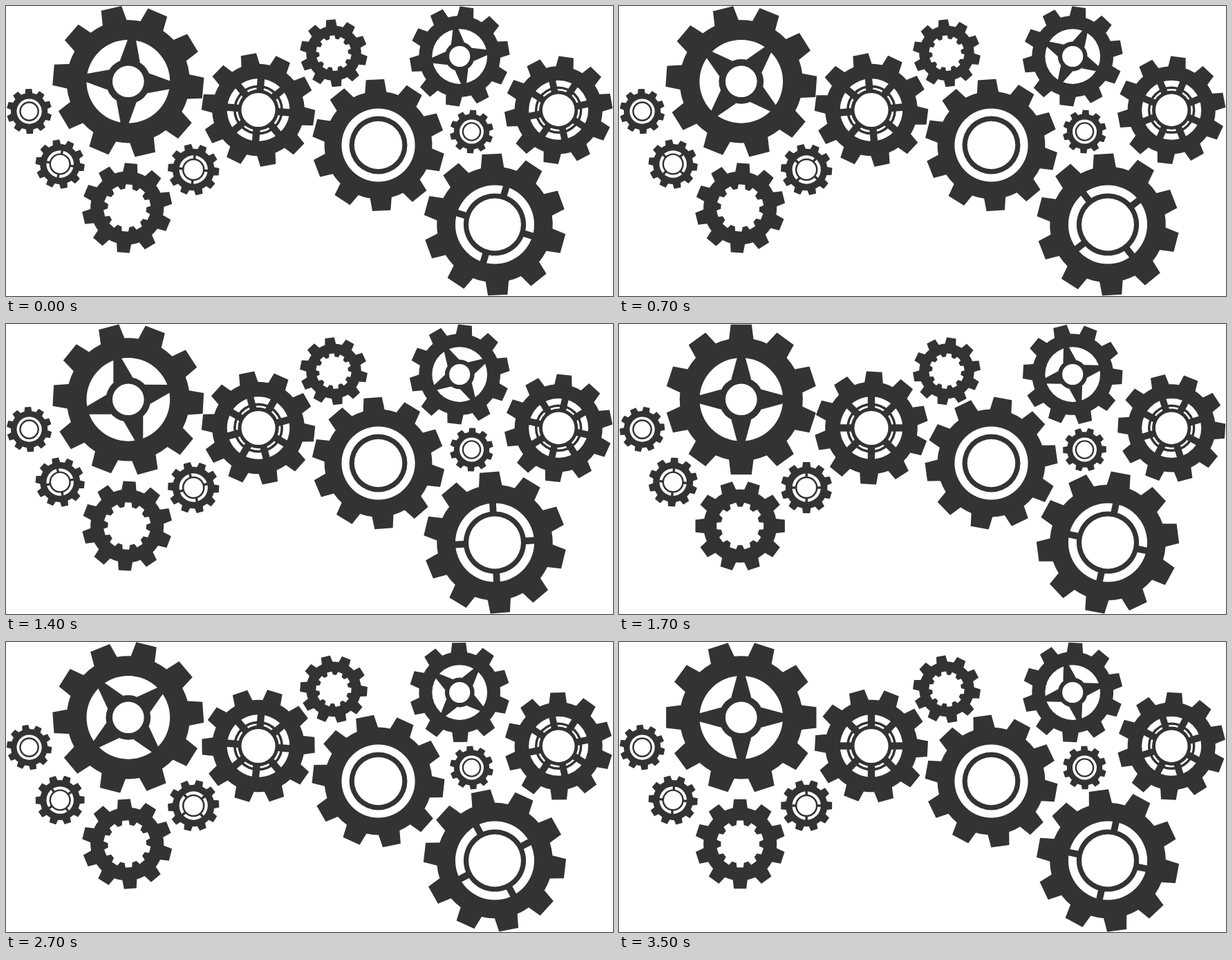
Write an HTML page with a canvas that moves like this. It is 878 px wide and 420 px high and loops after 3600 ms.

```html
<!DOCTYPE html>
<html lang="en">
<head>
<meta charset="utf-8">
<title>Turning gears</title>
<style>
html, body { margin: 0; width: 100%; height: 100%; overflow: hidden; background: #fff; }
canvas { display: block; }
</style>
</head>
<body>
<canvas id="stage" width="878" height="420"></canvas>
<script>
const ctx = document.getElementById('stage').getContext('2d');
const DARK = '#333', LIGHT = '#fff';
const RAD = Math.PI / 180, TAU = 2 * Math.PI;
const TEETH = 10, LOOP = 3600, STEP = 100, TURN = 5;

// x, y, radius, tooth angle, kind of centre, spoke angle
const gears = [
  [176.8, 109.3, 109.7, 18, star, 0],
  [365, 150.5, 82.3, 21, wheel, 0],
  [538.5, 201.5, 96, 28.2, ring],
  [707, 316.5, 103.2, 28.6, cross, 12],
  [656.2, 73, 72.5, 3.2, star, -13.5],
  [799.2, 150.8, 78.3, 3.2, wheel, -17],
  [474, 68.3, 49, 26, cog],
  [175.2, 292.5, 65.3, 0, cog],
  [78.2, 229, 35.7, 21.5, cross, 4],
  [271.2, 237, 37.3, 18, cross, 0],
  [33.6, 152.6, 32.8, 29.5, ring],
  [673.5, 182, 31.6, -1, ring]
];

function disc(r, color) {
  ctx.fillStyle = color;
  ctx.beginPath();
  ctx.arc(0, 0, r, 0, TAU);
  ctx.fill();
}

function toothed(r, angle, color) {
  const root = 0.812 * r, tip = 7.9 * RAD, base = 11.5 * RAD;
  ctx.fillStyle = color;
  ctx.beginPath();
  for (let i = 0; i < TEETH; i++) {
    const a = (angle - 90 + i * 360 / TEETH) * RAD;
    const next = a + TAU / TEETH;
    ctx.lineTo(r * Math.cos(a - tip), r * Math.sin(a - tip));
    ctx.lineTo(r * Math.cos(a + tip), r * Math.sin(a + tip));
    ctx.arc(0, 0, root, a + base, next - base);
  }
  ctx.fill();
}

// Spokes taper from half-width w0 at r0 to w1 at r1.
function spokes(n, angle, r0, w0, r1, w1) {
  ctx.fillStyle = DARK;
  for (let i = 0; i < n; i++) {
    ctx.save();
    ctx.rotate(angle * RAD + i * TAU / n);
    ctx.beginPath();
    ctx.moveTo(-w0, -r0);
    ctx.lineTo(-w1, -r1);
    ctx.lineTo(w1, -r1);
    ctx.lineTo(w0, -r0);
    ctx.fill();
    ctx.restore();
  }
}

function star(r, tooth, angle) {
  disc(0.55 * r, LIGHT);
  spokes(4, angle, 0.265 * r, 0.132 * r, 0.56 * r, 0.052 * r);
  disc(0.295 * r, DARK);
  disc(0.208 * r, LIGHT);
}

function wheel(r, tooth, angle) {
  disc(0.55 * r, LIGHT);
  disc(0.437 * r, DARK);
  disc(0.393 * r, LIGHT);
  disc(0.36 * r, DARK);
  spokes(8, angle, 0.33 * r, 0.063 * r, 0.56 * r, 0.063 * r);
  disc(0.298 * r, LIGHT);
}

function ring(r) {
  disc(0.553 * r, LIGHT);
  disc(0.437 * r, DARK);
  disc(0.362 * r, LIGHT);
}

function cross(r, tooth, angle) {
  disc(0.553 * r, LIGHT);
  disc(0.437 * r, DARK);
  spokes(4, angle, 0.41 * r, 0.047 * r, 0.565 * r, 0.047 * r);
  disc(0.368 * r, LIGHT);
}

function cog(r, tooth) {
  toothed(0.525 * r, tooth, LIGHT);
}

function draw(now) {
  const turn = TURN * (Math.floor(now % LOOP / STEP) + 1);
  ctx.fillStyle = LIGHT;
  ctx.fillRect(0, 0, 878, 420);
  for (const [x, y, r, tooth, centre, spoke = 0] of gears) {
    ctx.save();
    ctx.translate(x, y);
    toothed(r, tooth + turn, DARK);
    centre(r, tooth + turn, spoke + turn);
    ctx.restore();
  }
}

const start = performance.now();
function tick() {
  draw(performance.now() - start);
  requestAnimationFrame(tick);
}
tick();
</script>
</body>
</html>
```
